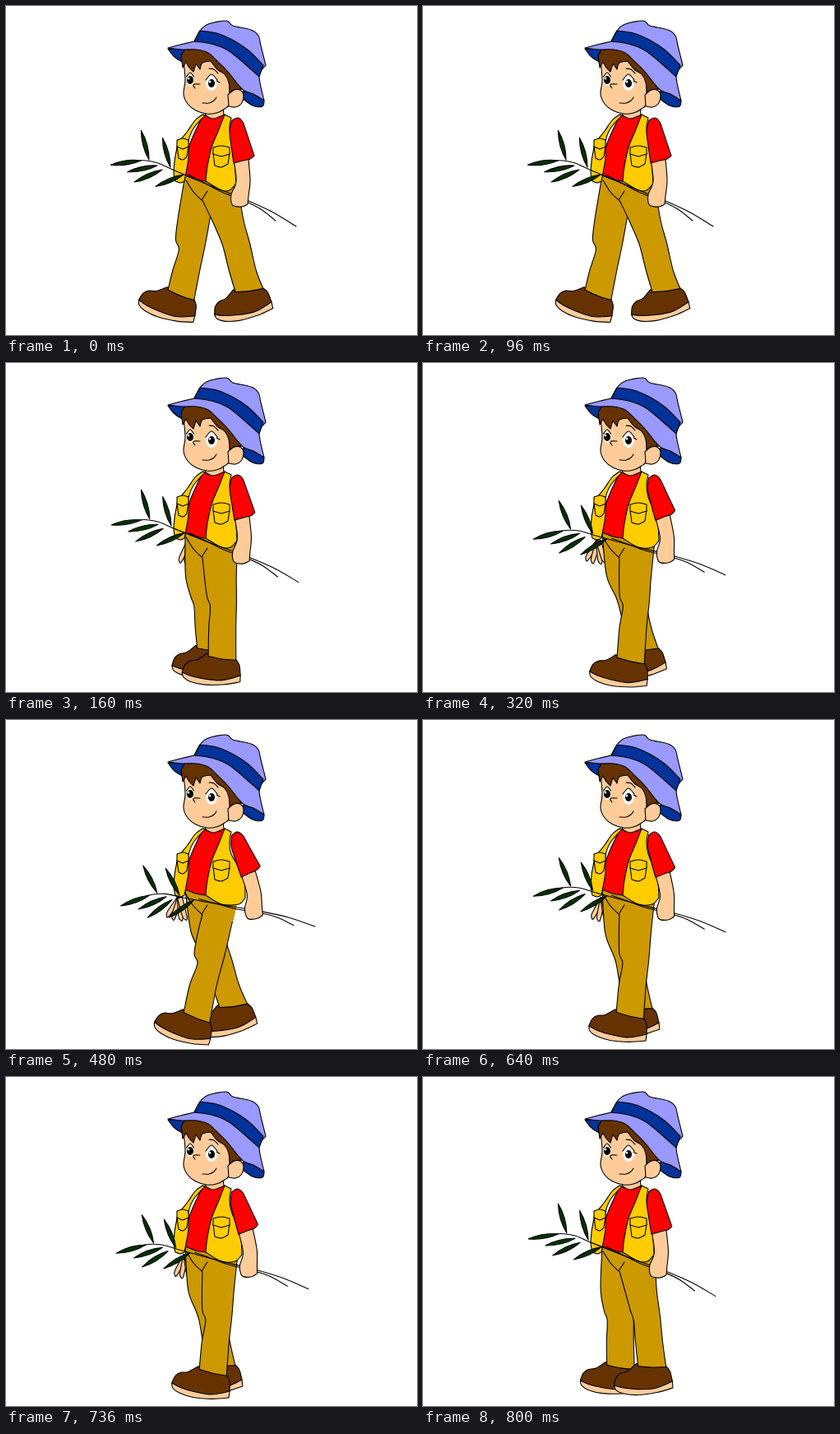
An HTML page that plays this animation: 500x400 px, repeating every 0.96 s.

```html
<!DOCTYPE html>
<html lang="en">
<head>
<meta charset="utf-8">
<title>Walking boy</title>
<style>
  html, body { margin: 0; width: 100%; height: 100%; overflow: hidden; background: #fff; }
  svg { display: block; width: 500px; height: 400px; }
  path, ellipse { stroke: #000; stroke-width: 1.1; stroke-linejoin: round; stroke-linecap: round; }
  .plain { stroke: none; }
</style>
</head>
<body>
<svg id="stage" viewBox="0 0 500 400"></svg>
<script>
const STEP = 160, STEPS = 6;
const C = { skin: '#ffcc99', brown: '#663300', red: '#ff0000', vest: '#ffcc00', pants: '#cc9900',
  hat: '#9999ff', band: '#003399', leaf: '#003300' };

// Toe of each shoe at every step of the walk.
const nearToe = [[255, 381], [214, 382], [202, 381], [179, 373], [201, 378], [233, 381]];
const farToe = [[160, 363], [202, 374], [226, 381], [236, 383], [217, 381], [191, 375]];

// Smooth curve through the points; "|" makes a corner at the point before it.
function curve(text) {
  let d = '', last = null;
  for (const part of text.split('|')) {
    const p = part.trim().split(/\s+/).map(s => s.split(',').map(Number));
    if (last) p.unshift(last);
    else d = `M${p[0]}`;
    for (let i = 0; i < p.length - 1; i++) {
      const b = p[i], c = p[i + 1], a = p[i - 1] || b, e = p[i + 2] || c;
      const h1 = b.map((v, k) => (v + (c[k] - a[k]) / 6).toFixed(1));
      const h2 = c.map((v, k) => (v - (e[k] - b[k]) / 6).toFixed(1));
      d += `C${h1} ${h2} ${c}`;
    }
    last = p[p.length - 1];
  }
  return d;
}
const open = (fill, pts) => `<path fill="${fill}" d="${curve(pts)}"/>`;
const shape = (fill, pts) => `<path fill="${fill}" d="${curve(pts)}Z"/>`;
const line = pts => open('none', pts);
const oval = (fill, cx, cy, rx, ry) =>
  `<ellipse class="plain" fill="${fill}" cx="${cx}" cy="${cy}" rx="${rx}" ry="${ry}"/>`;
const group = (transform, body) => `<g transform="${transform}">${body}</g>`;
const rad = deg => deg * Math.PI / 180;
// Goes from 0 to 1 and back once per loop.
const wave = step => (1 - Math.cos(2 * Math.PI * step / STEPS)) / 2;

// Toe at the origin, heel to the right.
const shoeArt =
  shape(C.skin, '0,-6 2,0 11,5 28,8 51,7 71,3 | 71,-6 | 40,-8 0,-6') +
  shape(C.brown, '0,-6 3,-15 9,-20 18,-22 29,-30 | 46,-29 63,-26 | 69,-18 71,-5 | 60,-1 47,2 28,1 11,-2 0,-6');

function leg([x, y], hip, toeMid, top) {
  const tilt = -0.38 * (x - toeMid);
  const spin = (dx, dy, deg) =>
    [dx * Math.cos(rad(deg)) - dy * Math.sin(rad(deg)), dx * Math.sin(rad(deg)) + dy * Math.cos(rad(deg))];
  const [ax, ay] = spin(48, -25, tilt).map((v, i) => v + (i ? y : x));
  const [cx, cy] = spin(17, 0, tilt + 6);
  const knee = (hip + ax) / 2, thigh = (hip + knee) / 2;
  const outline = `${top} ${thigh - 21},258 ${knee - 18},284 ${knee - 14},296 ${(knee + ax) / 2 - 16},322 ` +
    `${ax - cx},${ay - cy} | ${ax},${ay + 1} ${ax + cx},${ay + cy} | ` +
    `${(knee + ax) / 2 + 17},322 ${knee + 18},290 ${thigh + 18},258 ${hip + 20},216`;
  return group(`translate(${x} ${y}) rotate(${tilt})`, shoeArt) + open(C.pants, outline);
}

function leaf(x, y, deg) {
  return group(`translate(${x} ${y}) rotate(${deg})`,
    `<path fill="${C.leaf}" d="M0 0Q18 5 37 0Q18 -5 0 0Z"/>`);
}
const branchArt =
  line('160,188 171,188 185,191 205,200 245,217 295,237 325,251 353,268') +
  line('222,205 243,216 262,226 290,237 310,247 328,261') +
  leaf(164, 188, 172) + leaf(174, 187, 255) + leaf(200, 196, 255) +
  leaf(184, 194, 168) + leaf(190, 199, 156) + leaf(216, 205, 157);

const armArt =
  shape(C.skin, '277,186 280,213 274,229 274,239 277,243 287,244 294,241 | 295,231 297,212 295,186') +
  shape(C.red, '275,139 282,136 288,141 292,152 302,182 | 297,186 288,188 277,191 | 274,170 272,152 275,139');

const finger = deg => group(`rotate(${deg} 211 216)`, shape(C.skin, '208,216 208,238 210,243 213,242 214,216'));
const farHand = [35, 18, -3, -15].map(finger).join('');

// Flap and bag, placed by the left end of the flap.
const pocket = (x, y, w, h) =>
  shape(C.vest, `${x},${y + 7} ${x + 2},${y + h} | ${x + w / 2},${y + h + 2} ${x + w - 2},${y + h - 2} | ${x + w},${y + 7}`) +
  shape(C.vest, `${x},${y} ${x + w / 2},${y - 2} ${x + w},${y} | ${x + w},${y + 8} | ${x + w / 2},${y + 11} | ${x},${y + 8} | ${x},${y}`);

const torso = hem =>
  shape(C.skin, '244,127 243,133 254,138 265,133 | 264,122') +
  shape(C.red, '240,132 252,137 266,132 | 270,150 243,213 | 231,211 218,206 | 223,170 240,132') +
  shape(C.vest, '239,132 230,139 221,152 213,162 208,172 204,200 206,213 | 212,215 217,213 | 222,185 222,165 228,149 242,133') +
  shape(C.vest, `266,132 274,136 | 272,148 274,163 ${hem - 2},190 ${hem},216 | ${hem - 8},224 262,224 243,213 | 245,195 250,172 259,150 266,132`) +
  pocket(208, 163, 14, 22) + pocket(252, 172, 20, 22);

const eye = (x, y, rx, ry) =>
  oval('#fff', x, y, rx, ry) + oval('#000', x, y + 1, 4, 5) + oval('#fff', x - 2, y - 1, 1.3, 1.6) +
  line(`${x - rx},${y - 3} ${x},${y - ry} ${x + rx},${y - 3}`);

const head =
  shape(C.band, '197,52 204,61 214,68 | 232,53') +
  shape(C.band, '289,103 301,107 314,115 | 312,122 300,121 287,112') +
  shape(C.skin, '216,66 218,90 216,107 221,119 231,127 244,131 256,130 266,125 272,118 276,90 250,60') +
  shape(C.brown, '213,60 215,75 | 219,68 | 223,75 228,80 | 231,70 | 236,77 | 239,69 249,67 | 257,77 266,83 271,93 272,106 | 277,102 289,101 | 250,52 218,52') +
  shape(C.skin, '270,108 278,102 286,103 289,109 286,119 279,123 271,122') +
  eye(224, 89, 4.5, 8) + eye(250, 93, 7, 10) +
  line('247,76 253,77 258,82') + line('256,91 260,93') +
  line('236,95 229,95 228,97 230,100') + line('239,118 247,118 253,115 256,111') +
  shape(C.hat, '197,51 212,47 229,43 | 236,30 246,22 268,18 276,24 298,29 307,36 310,48 316,72 | 308,85 314,115 | 301,107 290,103 281,94 270,80 258,68 246,57 232,53 214,53 197,51') +
  shape(C.band, '229,43 236,30 | 256,33 277,42 295,54 313,72 | 308,86 | 290,70 270,54 250,46 229,43');

function scene(step) {
  const swing = wave(step) ** 1.6, hem = 280 + 11 * swing;
  return group(`rotate(${17 * (wave(step + 0.3) - 1)} 222 150)`, farHand) +
    leg(farToe[step], 236, 200, '218,206') +
    leg(nearToe[step], 262, 220, '239,236') +
    `<path class="plain" fill="${C.pants}" d="M219 206L${hem - 8} 216L276 245L239 236L222 222Z"/>` +
    line('219,212 228,226 238,236 | 245,225') +
    torso(hem) +
    group(`rotate(${-12.3 * swing} 286 153)`, branchArt) +
    group(`rotate(${-10.8 * swing} 282 142)`, armArt) +
    head;
}

const stage = document.getElementById('stage');
const scenes = Array.from({ length: STEPS }, (_, step) => scene(step));
const start = performance.now();
let shown = -1;
function tick() {
  const step = Math.floor((performance.now() - start) / STEP) % STEPS;
  if (step !== shown) stage.innerHTML = scenes[shown = step];
  requestAnimationFrame(tick);
}
tick();
</script>
</body>
</html>
```
